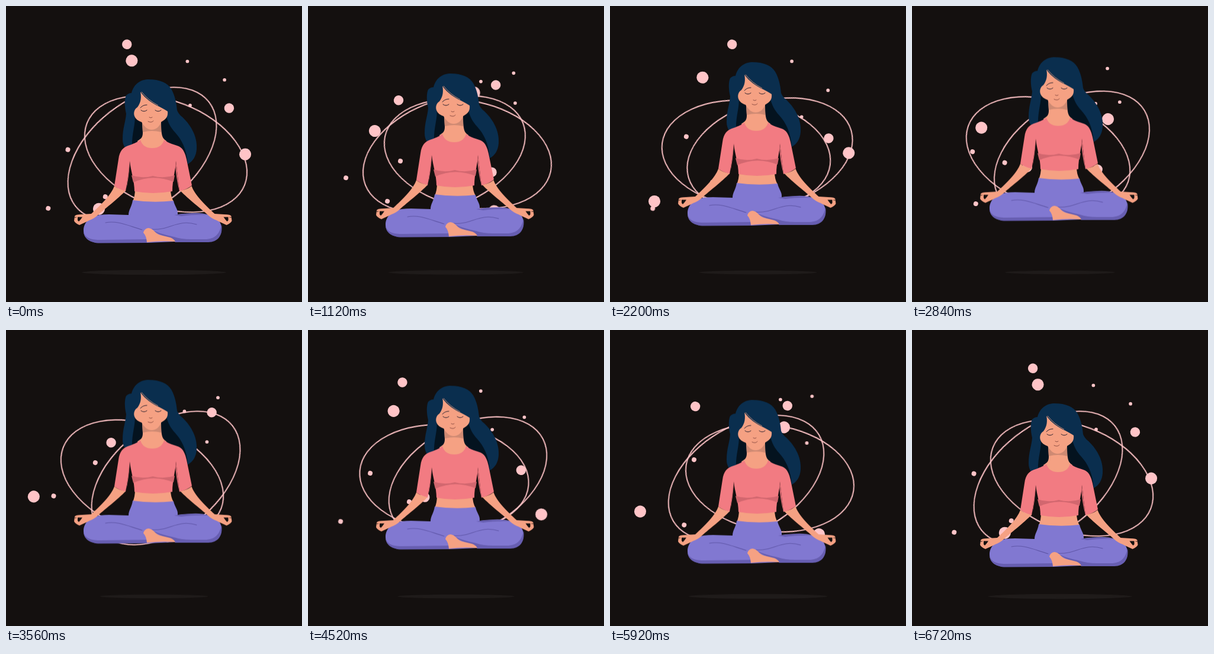
An HTML page that plays this animation: 500 px wide and 500 px high, repeating every 6760 ms.

```html
<!DOCTYPE html>
<html lang="en">
<head>
<meta charset="utf-8">
<title>Floating meditation</title>
<style>
  html, body { margin: 0; width: 100%; height: 100%; overflow: hidden; background: #14100f; }
  svg { display: block; width: 100vw; height: 100vh; }

  :root { --loop: 6760ms; --sine: cubic-bezier(.364, 0, .636, 1); }

  .body { animation: bob var(--loop) var(--sine) infinite; }
  .shadow { fill: #1f1b1a; transform-origin: 250px 450px; animation: shrink var(--loop) var(--sine) infinite; }

  .ring { fill: none; stroke: #ffc4c7; stroke-width: 1.9; animation: tilt var(--loop) var(--sine) infinite; }
  .ring.a { transform-origin: 270px 250px; animation-delay: -6544ms; }
  .ring.b { transform-origin: 230px 250px; animation-delay: -3446ms; }

  /* Dots chase each other around one three-lobed track, reused at four sizes. */
  .dots circle {
    r: 6.75px;
    fill: #ffc4c7;
    offset-path: path("M101 5 C104 55 55 65 52 88 C48 118 38 148 13 148 C-28 149 -53 66 -48.5 45 C-48 20 -95 8 -95 -32 C-95 -57 -72 -84 -47 -84 C-14 -84 10 -37 50 -36.5 C80 -36 98.5 -30 101 5 Z");
    offset-rotate: 0deg;
    animation: travel var(--loop) linear infinite;
  }
  .dots circle:nth-child(1) { --start: 97.8%; }
  .dots circle:nth-child(2) { --start: 39%; }
  .dots circle:nth-child(3) { --start: 71.5%; }

  @keyframes bob { 50% { transform: translateY(-40px); } }
  @keyframes shrink { 50% { transform: scale(.75); } }
  @keyframes tilt {
    0%, 100% { transform: rotate(22deg); }
    50% { transform: rotate(-38deg); }
  }
  @keyframes travel {
    0% { offset-distance: var(--start); }
    99.41%, 100% { offset-distance: calc(var(--start) + 100%); }
  }

  .hair { fill: #0a2e4e; }
  .deep { fill: #04131f; }
  .skin { fill: #f5a183; }
  .neck-shade { fill: #cf8a73; }
  .shirt { fill: #f27b82; }
  .shirt-shade { fill: #d2676f; }
  .pants { fill: #8178d1; }
  .pants-shade { fill: #675eb1; }
  .line { fill: none; stroke: #2b2230; stroke-width: 1; stroke-linecap: round; }
  .crease { fill: none; stroke: #6057a9; stroke-width: 1.1; stroke-linecap: round; }
</style>
</head>
<body>
<svg viewBox="0 0 500 500">
  <ellipse class="shadow" cx="250" cy="450" rx="122" ry="4.2"/>

  <ellipse class="ring a" cx="270" cy="250" rx="143" ry="89.5"/>
  <ellipse class="ring b" cx="230" cy="250" rx="143" ry="89.5"/>

  <g class="dots" transform="translate(327.7 128.7) scale(.42)"><circle/><circle/><circle/></g>
  <g class="dots" transform="translate(113 301.7) rotate(15) scale(.59 -.59)"><circle/><circle/><circle/></g>
  <g class="dots" transform="translate(256 172.500) rotate(5.5) scale(1.22)"><circle/><circle/><circle/></g>
  <g class="dots" transform="translate(259.3 232.3) rotate(-114) scale(1.49 -1.49)"><circle/><circle/><circle/></g>

  <g class="body">
    <!-- hair -->
    <path class="hair" d="M241 124 C260 124 273 130 279 140 C286 152 288 166 289 176 C291 181 293 183 296 186 C310 198 324 219 322 242 C321 254 316 262 307 267 L268 250 L213 246 C203 244 197 237 197 225 C197 206 202 196 203 182 C200 170 200 157 203 151 Q207 147 212 147 C216 131 228 124 241 124Z"/>
    <path class="deep" d="M217 184 C220 198 212 214 213 240 L232 228 L231 194Z"/>
    <path class="deep" d="M260 196 L270 182 C273 197 278 205 286 214 C297 226 305 242 307 266 L268 250Z"/>

    <!-- neck, waist and face -->
    <path class="skin" d="M230 194 L231 214 C231 221 229 224 222 228 L226 243 L268 243 L271 228 C264 223 262 220 262 194Z"/>
    <path class="neck-shade" d="M230 197 L231 213 Q247 209 262 213 L262 197Z"/>
    <path class="skin" d="M227 145 C229 154 228 163 222 171 C217 174 215 180 217 186 C219 191 223 194 229 196 C234 205 240 209 246 209 C252 209 259 205 262 196 C271 191 274 186 273 178 C269 175 264 173 259 170 C246 164 236 157 227 145Z"/>
    <path d="M229 145 Q240 159 257 168" fill="none" stroke="#f5a183" stroke-width=".8"/>
    <path class="line" d="M227 172 Q231 167 238 167 M228 176 Q233 180 238 176 M252 176 Q257 180 262 176"/>
    <path class="line" style="stroke:#8f4f44" d="M242 188 Q245 190 247 188 M240 195 Q246 198 249 194"/>
    <path class="skin" d="M218 308 Q218 322 214 330 Q248 336 283 330 Q278 322 278 308Z"/>

    <!-- shirt -->
    <path class="shirt" d="M227 226 Q231 240 247 240 Q263 240 267 226 C276 233 285 234 292 237 C300 241 303 250 305 259 L314 303 Q306 310 293 313 L287 262 C287 275 281 293 281 313 Q248 319 217 313 C217 295 211 280 209 262 C208 280 205 295 202 313 Q191 310 183 304 L190 259 C192 244 198 239 206 236 C214 233 221 231 227 226Z"/>
    <path class="shirt-shade" d="M212 286 Q230 292 248 287 Q266 292 285 286 L283 297 Q248 283 215 298Z"/>
    <path class="shirt-shade" d="M209 261 L203 309 L202 313 Q208 291 209 261Z M287 261 L293 313 Q287 290 286 268Z"/>

    <!-- legs -->
    <path class="pants" d="M214 328 Q248 333 283 329 C285 339 291 343 290 352 C310 350 328 348 343 353 C357 357 365 365 364 378 C363 391 355 398 342 398 L286 398 L238 400 L160 400 C140 400 131 392 131 379 C131 366 141 356 158 353 C174 351 191 353 207 353 C207 344 213 338 214 328Z"/>
    <path class="pants-shade" d="M131 381 C134 393 145 395 160 395 L238 394 L238 400 L160 400.500 C143 401 132 393 131 381Z"/>
    <path class="pants-shade" d="M364 369 C367 388 357 399 342 399 L286 399 C276 391 262 389 248 379 C260 384 270 387 284 390 Q296 394 312 394 L336 394 C353 394 361 385 364 369Z"/>
    <path class="pants-shade" d="M284 353 Q313 348 343 353 Q317 352 296 355Z"/>
    <path class="crease" d="M168 366 C188 362 206 371 230 378 M246 377 C276 380 289 359 322 369"/>
    <path class="skin" d="M232 383 C233 378 237 375 241 375 C249 376 251 383 258 386 C268 390 282 389 286 398 Q263 396 238 399 Q237 388 232 383Z"/>

    <!-- arms -->
    <g id="arm">
      <path class="skin" d="M183 304 C178 319 160 336 144 351 L128 352 Q117 352 116 355 L115 363 Q117 367 124 370 L137 364 C142 361 147 360 152 356 C165 344 190 325 202 312 Q190 310 183 304Z"/>
      <path d="M121 356.500 L129 356.500 Q126 361 123 364 L121 362Z" fill="#14100f"/>
      <path d="M115 357 L119 357" stroke="#14100f" stroke-width=".8"/>
    </g>
    <use href="#arm" transform="matrix(-1 0 0 1 496.500 0)"/>
  </g>
</svg>
</body>
</html>
```
